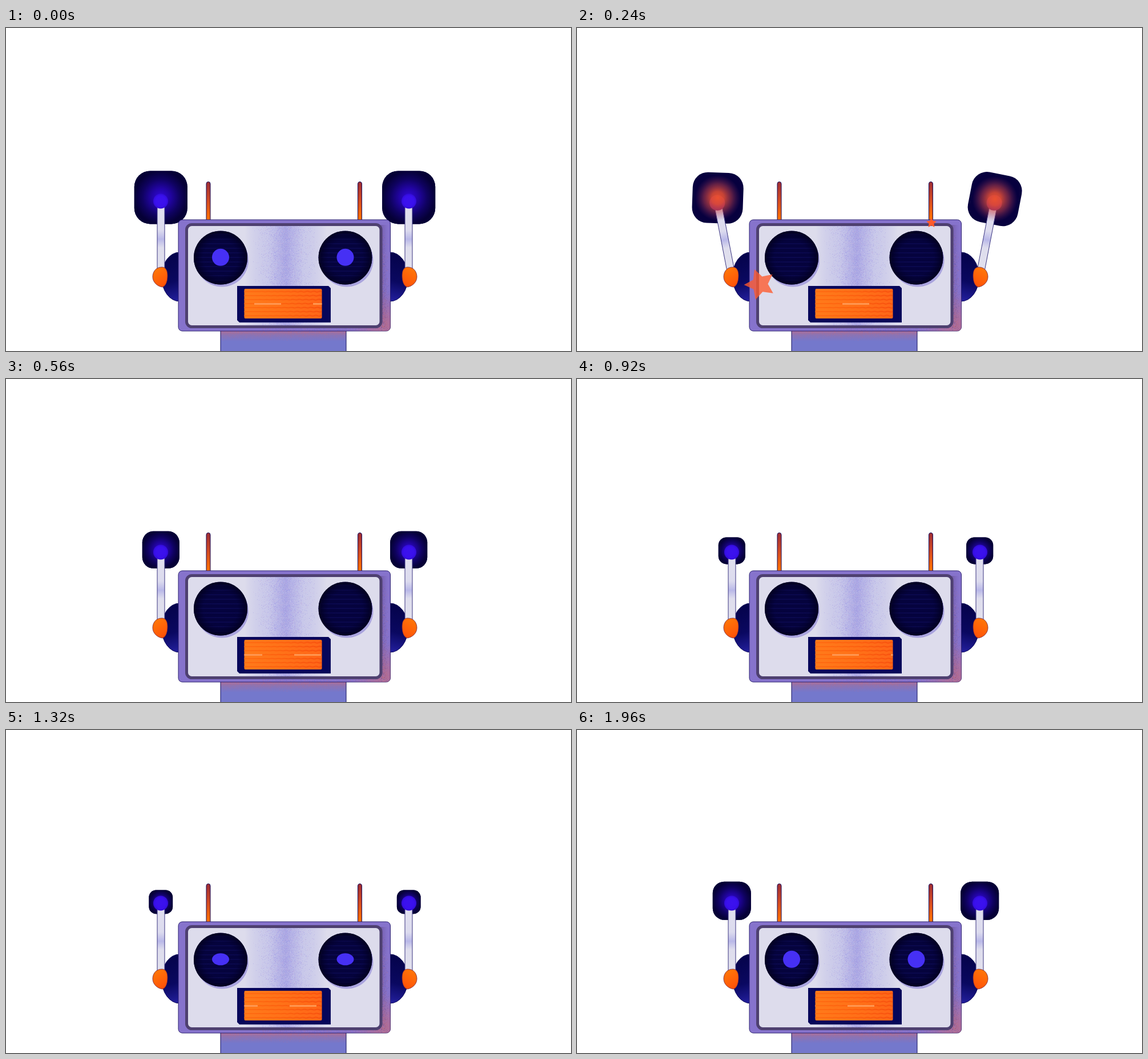
These frames come from a looping animation (990 px wide and 566 px high, 2000 ms). An HTML page with a canvas:

```html
<!DOCTYPE html>
<html lang="en">
<head>
<meta charset="utf-8">
<title>Robot</title>
<style>
html, body { margin: 0; width: 100%; height: 100%; overflow: hidden; background: #fff; }
canvas { display: block; }
</style>
</head>
<body>
<canvas id="stage" width="990" height="566"></canvas>
<script>
const W = 990, H = 566, LOOP = 2000, STEP = 40, MIRROR = 977;
const RAD = Math.PI / 180;
const NAVY = '#100c5c';
const EYES = [376, 594.5], EYE_Y = 402.5;
const view = document.getElementById('stage').getContext('2d');
const back = layer(), front = layer();
let c;

function layer() {
  const canvas = document.createElement('canvas');
  canvas.width = W;
  canvas.height = H;
  return canvas.getContext('2d');
}

let seed = 7;
const rnd = () => (seed = seed * 16807 % 2147483647) / 2147483647;
const bell = () => (rnd() + rnd() + rnd()) * 2 / 3 - 1;
const pick = list => list[Math.floor(rnd() * list.length)];

// Piecewise linear value through [time, value] pairs
function track(t, keys) {
  const i = keys.findIndex(k => k[0] > t);
  if (i < 0) return keys[keys.length - 1][1];
  if (!i) return keys[0][1];
  const [t0, a] = keys[i - 1], [t1, b] = keys[i];
  return a + (b - a) * (t - t0) / (t1 - t0);
}

function fade(g, stops) {
  stops.forEach(([at, color]) => g.addColorStop(at, color));
  return g;
}
const linear = (x0, y0, x1, y1, ...stops) => fade(c.createLinearGradient(x0, y0, x1, y1), stops);
const radial = (x, y, r, ...stops) => fade(c.createRadialGradient(x, y, 0, x, y, r), stops);

function paint(fill, stroke, width = 1) {
  if (fill) { c.fillStyle = fill; c.fill(); }
  if (stroke) { c.strokeStyle = stroke; c.lineWidth = width; c.stroke(); }
}
function box(x, y, w, h, r, fill, stroke, width) {
  c.beginPath();
  c.roundRect(x, y, w, h, r);
  paint(fill, stroke, width);
}
function oval(x, y, rx, ry, fill, stroke) {
  c.beginPath();
  c.ellipse(x, y, rx, ry, 0, 0, Math.PI * 2);
  paint(fill, stroke);
}
function grain(n, place, colors, alpha) {
  c.globalAlpha = alpha;
  for (let i = 0; i < n; i++) {
    const [x, y] = place();
    c.fillStyle = pick(colors);
    c.fillRect(Math.floor(x), Math.floor(y), 1, 1);
  }
  c.globalAlpha = 1;
}
function mirrored(draw) {
  for (const right of [false, true]) {
    c.save();
    if (right) { c.translate(MIRROR, 0); c.scale(-1, 1); }
    draw(right);
    c.restore();
  }
}
function turn(x, y, degrees) {
  c.translate(x, y);
  c.rotate(degrees * RAD);
  c.translate(-x, -y);
}

function drawBack() {
  c = back;
  mirrored(() => oval(304, 436, 31.5, 43,
    linear(285, 400, 305, 479, [0, '#05034c'], [0.55, '#0a0860'], [1, '#2420a0']), NAVY));
  box(376, 520, 220, 60, 0,
    linear(0, 531, 0, 549, [0, '#ab6f98'], [0.4, '#8b73b4'], [1, '#7478cc']), NAVY);
  grain(700, () => [377 + rnd() * 218, 531 + rnd() * rnd() * 18], ['#c86a7c', '#7478cc'], 0.3);
  for (const x of [354.5, 620])
    box(x - 3.5, 269.5, 7, 70, [3.5, 3.5, 0, 0],
      linear(0, 269, 0, 336, [0, '#9c2c35'], [0.5, '#d24a22'], [1, '#ff7200']), NAVY);
}

function drawFace() {
  box(302, 336, 371.5, 195, 7, '#8673cc', '#2a2070');
  c.save();
  c.clip();
  c.fillStyle = linear(657, 0, 672, 0, [0, 'rgba(104,80,150,.7)'], [1, 'rgba(134,115,204,0)']);
  c.fillRect(657, 345, 16, 180);
  c.fillStyle = radial(662, 522, 60, [0, 'rgba(205,105,115,.65)'], [1, 'rgba(205,105,115,0)']);
  c.fillRect(600, 460, 75, 72);
  grain(900, () => [657 + rnd() * rnd() * 16, 350 + Math.sqrt(rnd()) * 180], ['#c07080', '#5c4c9c', '#9a80d0'], 0.35);
  grain(450, () => [450 + rnd() * 215, 525 + rnd() * 5], ['#b07098', '#7060b8'], 0.3);
  c.restore();

  box(316.5, 344.5, 340.5, 179, 9, '#dddcec');
  c.save();
  c.clip();
  c.fillStyle = linear(418, 0, 562, 0, [0, 'rgba(170,170,228,0)'], [0.28, 'rgba(190,190,232,.65)'],
    [0.5, 'rgba(164,162,226,.9)'], [0.72, 'rgba(190,190,232,.65)'], [1, 'rgba(170,170,228,0)']);
  c.fillRect(418, 347, 144, 174);
  grain(6000, () => [490 + bell() * 62, 347 + rnd() * 174], ['#8c86e2', '#aaa0ea', '#d4cef2', '#c4a6d8'], 0.35);
  c.restore();
  box(316.5, 344.5, 340.5, 179, 9, null, '#4e4070', 5);
}

function drawEye(x) {
  oval(x + 2.5, EYE_Y + 4.5, 46.5, 46.5, '#aaa4de');
  oval(x, EYE_Y, 47, 47, '#05033f');
  c.save();
  c.clip();
  for (let y = 361; y < 450; y += 8) {
    c.fillStyle = '#0b0950';
    c.fillRect(x - 47, y, 94, 2);
  }
  c.fillStyle = radial(x, EYE_Y, 47, [0, 'rgba(2,0,40,0)'], [0.65, 'rgba(2,0,40,.1)'], [1, 'rgba(2,0,30,.95)']);
  c.fillRect(x - 47, EYE_Y - 47, 94, 94);
  c.restore();
}

function drawMouth() {
  c.beginPath();
  c.moveTo(405, 452);
  c.lineTo(565, 452);
  c.lineTo(569, 456);
  c.lineTo(569, 516);
  c.lineTo(409, 516);
  c.lineTo(405, 512);
  c.closePath();
  paint('#06065a');
  box(417.5, 457, 136, 52, 2, linear(417, 0, 554, 0, [0, '#ff7a1a'], [0.55, '#ff7018'], [1, '#ff6618']));
  c.save();
  c.clip();
  for (let y = 462; y < 510; y += 7) {
    c.beginPath();
    for (let x = 417; x <= 554; x += 2) {
      const wave = (x - 417) / 137;
      c.lineTo(x, y + Math.sin(x * 0.55 + y) * wave * 0.7);
    }
    paint(null, linear(417, 0, 554, 0, [0, '#ff6c12'], [0.5, '#fd600f'], [1, '#f8500e']), 2);
  }
  c.restore();
}

function drawFront() {
  c = front;
  drawFace();
  EYES.forEach(drawEye);
  drawMouth();
}

function drawArm(t, right) {
  const angle = track(t, [[0, 0], [40, 4], [80, 8], [120, 10.5], [160, 11], [280, 11], [360, 8], [440, 3], [520, 0]]);
  const size = track(t, [[0, 93], [80, 112], [130, 123], [180, 108], [240, 89], [400, 76], [560, 65], [740, 55],
    [920, 47], [1120, 42.5], [1280, 41], [1400, 43], [1600, 51], [1780, 58.5], [1960, 67], [2000, 69]]);
  const red = track(t, [[0, 0], [160, 1], [280, 1], [480, 0]]);
  const x = 271.3, y = 305 - size * 0.0866;

  // The left lamp stays almost upright while its arm leans
  const inLamp = draw => {
    c.save();
    if (!right) {
      turn(271, 305, angle * 1.18);
      c.translate(0, -angle * 0.17);
    }
    draw();
    c.restore();
  };

  c.save();
  turn(270.5, 436, -angle);
  inLamp(() => {
    box(x - size / 2, y - size / 2, size, size, size * 0.3, '#07003e');
    c.globalAlpha = 1 - red;
    paint(radial(x, y, size / 2, [0, '#3208dc'], [0.35, '#2204a4'], [0.7, '#0f0260'], [1, '#050036']));
  });

  box(265, 306, 13, 121, 0, linear(0, 306, 0, 427,
    [0, '#e2e1f0'], [0.4, '#dcdbee'], [0.53, '#b9b8e8'], [0.65, '#dedded'], [1, '#e2e1ee']), '#3a3580');

  oval(271, 303.5, 13, 13, radial(271, 303.5, 13, [0, '#3c12ee'], [0.7, '#3a10ee'], [1, '#320cd8']));
  if (red) {
    c.globalAlpha = red;
    oval(271, 304, 13.5, 13.5, '#7a1c6c');
    inLamp(() => oval(x, y, 40, 40, radial(x, y, 40, [0, 'rgba(238,82,46,.97)'],
      [0.28, 'rgba(230,78,52,.86)'], [0.62, 'rgba(196,66,76,.48)'], [1, 'rgba(120,40,100,0)'])));
    c.globalAlpha = 1;
  }
  c.restore();

  c.beginPath();
  c.moveTo(273, 419);
  c.bezierCurveTo(262, 419, 257, 428, 257, 436);
  c.bezierCurveTo(257, 446, 266, 453, 274, 454);
  c.bezierCurveTo(281, 452, 283, 442, 283, 434);
  c.bezierCurveTo(283, 425, 280, 419, 273, 419);
  paint(linear(260, 420, 280, 454, [0, '#ff7a08'], [1, '#ff4e08']), '#70203c', 0.8);
}

function drawStar(t, x, y, born, spin) {
  const age = t - born;
  if (age <= 0 || age >= 280) return;
  const r = Math.min(age * 0.23, 20 + age * 0.05);
  c.save();
  c.translate(x, y);
  c.rotate(spin * age / 160);
  c.globalAlpha = track(age, [[0, 1], [80, 1], [160, 0.78], [280, 0]]);
  c.beginPath();
  for (let i = 0; i < 10; i++) {
    const a = i * Math.PI / 5 - Math.PI / 2, d = i % 2 ? r * 0.5 : r;
    c.lineTo(Math.cos(a) * d, Math.sin(a) * d);
  }
  c.closePath();
  paint('#ff5a2c');
  c.restore();
}

function drawPupils(t) {
  const open = track(t, [[0, 1], [160, 0], [1200, 0], [1320, 0.7], [1400, 1]]);
  if (open > 0) EYES.forEach(x => oval(x, EYE_Y - 0.7, 15, 15 * open, '#4630f4'));
}

function drawDashes(t) {
  c.save();
  c.beginPath();
  c.rect(417.5, 457, 136, 52);
  c.clip();
  c.fillStyle = '#ff9650';
  const x = 435 + (t * 0.125) % 103;
  for (const shift of [-103, 0, 103]) c.fillRect(x + shift, 482, 47, 3);
  c.restore();
}

function frame(now) {
  const t = Math.floor(now % LOOP / STEP) * STEP;
  c = view;
  c.clearRect(0, 0, W, H);
  c.drawImage(back.canvas, 0, 0);
  mirrored(right => drawArm(t, right));
  c.drawImage(front.canvas, 0, 0);
  drawPupils(t);
  drawDashes(t);
  drawStar(t, 320.5, 449, 80, -0.35);
  drawStar(t, 621, 341.5, 200, 0);
}

drawBack();
drawFront();
const start = performance.now();
function loop() {
  frame(performance.now() - start);
  requestAnimationFrame(loop);
}
loop();
</script>
</body>
</html>
```
